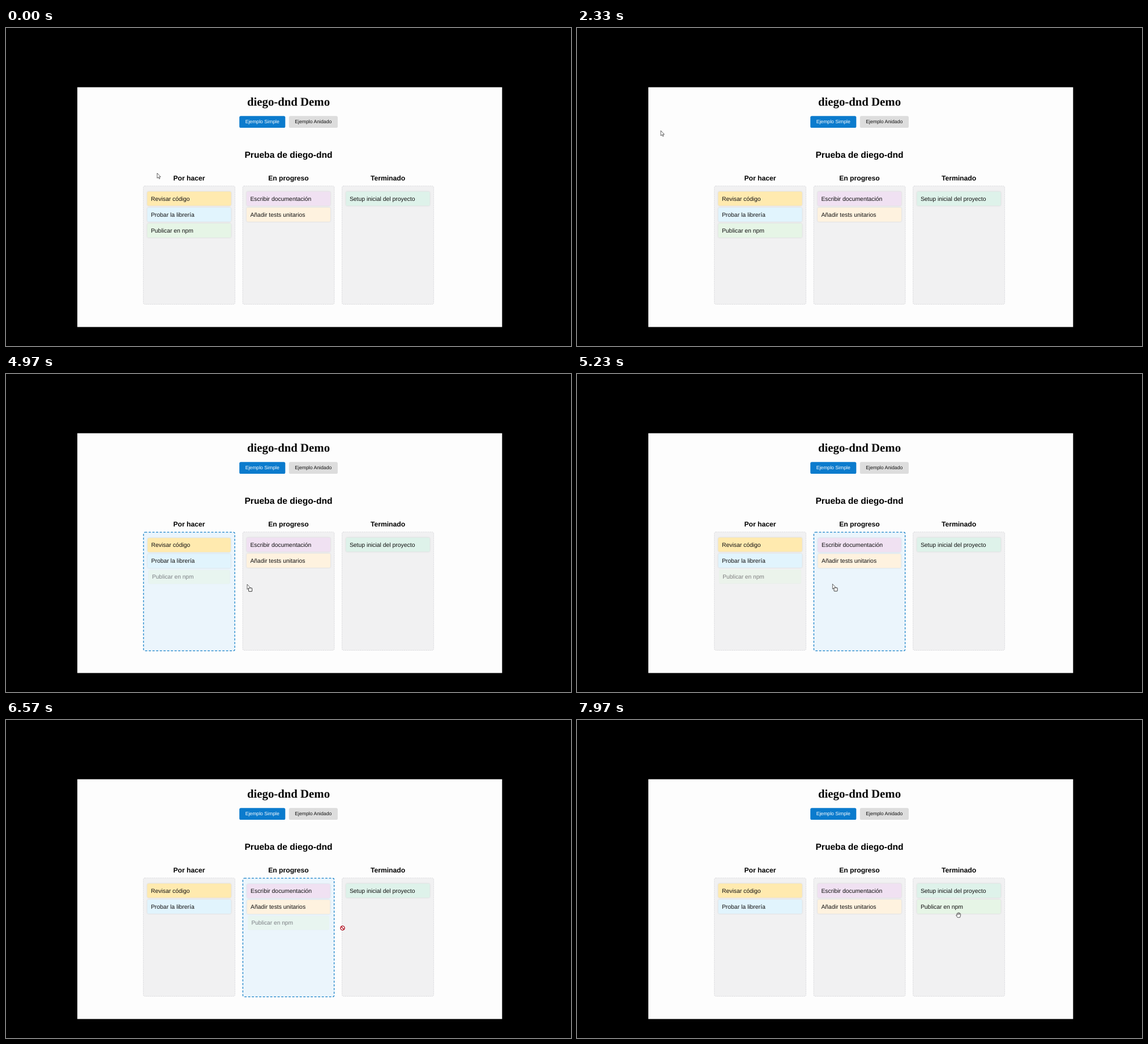
These frames come from a looping animation (998x561 px, 8000 ms). An HTML page:

```html
<!DOCTYPE html>
<html lang="es">
<head>
<meta charset="utf-8">
<title>diego-dnd Demo</title>
<style>
  html, body { margin: 0; width: 100%; height: 100%; overflow: hidden; background: #000; }
  svg { display: block; width: 998px; height: 561px; }
  text { font-family: "Liberation Sans", Arial, sans-serif; fill: #111; text-rendering: geometricPrecision; }
  .mid { text-anchor: middle; }
  .title { font: bold 20.8px "Liberation Serif", "Times New Roman", serif; fill: #000; }
  .sub { font-size: 15.6px; font-weight: bold; fill: #000; }
  .head { font-size: 12.17px; font-weight: bold; fill: #000; }
  .btn { font-size: 8.67px; }
  .task { font-size: 10.4px; }
  .card { filter: drop-shadow(0 .65px .8px rgba(0, 0, 0, .14)); }
</style>
</head>
<body>
<svg id="stage" viewBox="0 0 998 561">
  <rect x="126" y="104.5" width="750.3" height="423" fill="#fdfdfd"/>
  <text class="mid title" x="499" y="137.3">diego-dnd Demo</text>
  <rect x="412.2" y="155.2" width="81.1" height="20.8" rx="2.6" fill="#0b7bcd"/>
  <text class="mid btn" x="452.7" y="168.4" style="fill:#fff">Ejemplo Simple</text>
  <rect x="499.8" y="155.2" width="86.1" height="20.8" rx="2.6" fill="#ddd"/>
  <text class="mid btn" x="542.8" y="168.4">Ejemplo Anidado</text>
  <text class="mid sub" x="499" y="229.2">Prueba de diego-dnd</text>
  <g id="board"></g>
  <g id="arrow">
    <path d="M0 0V9L2.1 7.2L3.6 10.2L4.9 9.6L3.5 6.7H6.2Z" fill="#fff" stroke="#222" stroke-width=".7"/>
    <rect id="parcel" x="2.6" y="6.6" width="6" height="6" rx=".6" fill="#fff" stroke="#222" stroke-width=".9"/>
  </g>
  <g id="hand">
    <path d="M-1.9 4.3L-4.2 .9Q-4.4 -.4 -3.1 -.1L-2.5 .5L-3 -2.4Q-2.3 -3.8 -1.6 -2.8L-1.2 -3.7Q-.4 -4.8 .3 -3.7Q1.6 -4.5 2 -2.8Q3.5 -3.1 3.6 -1.6L3.5 1L2.4 4.3Z
      M-1.5 -2.8L-1 -.5M.3 -3.7V-.5M2 -2.8L1.7 -.3" fill="#fff" stroke="#222" stroke-width=".75" stroke-linejoin="round"/>
  </g>
  <g id="deny" fill="none" stroke="#b00d1e" stroke-width="1.4">
    <circle r="3.6" fill="#fff"/>
    <path d="M-2.5 -2.5L2.5 2.5"/>
  </g>
</svg>
<script>
const LOOP = 8000;
const TOP = 278.4, COL_W = 162.5;
const colX = [242.25, 417.75, 593.25];
const heads = ['Por hacer', 'En progreso', 'Terminado'];

// text, colour, column, row
const tasks = [
  ['Revisar código', '#ffeaaf', 0, 0],
  ['Probar la librería', '#e1f4fd', 0, 1],
  ['Publicar en npm', '#e6f5e6', 0, 2],
  ['Escribir documentación', '#f0e1f2', 1, 0],
  ['Añadir tests unitarios', '#fef2df', 1, 1],
  ['Setup inicial del proyecto', '#def2ea', 2, 0]
];
const MOVER = 2;

// pointer: time, x, y
const path = [
  [0, 267, 256], [770, 600, 258], [1070, 600, 258], [1530, 330, 252], [1670, 330, 252],
  [2330, 148, 181], [2470, 330, 357], [4770, 330, 357], [4970, 426, 371],
  [5480, 475, 370], [5720, 475, 370], [6170, 500, 360], [6330, 500, 360],
  [6570, 594.5, 367], [6970, 634.5, 349], [7170, 634.5, 349], [7940, 674, 344]
];
// state changes: time, pointer kind, active column, column and row of the moved task
const states = [
  [0, 'arrow', -1, 0, 2],
  [2450, 'hand', -1, 0, 2],
  [4820, 'drag', 0, 0, 2],
  [5000, 'drag', 1, 0, 2],
  [5470, 'arrow', -1, 1, 2],
  [6000, 'hand', -1, 1, 2],
  [6390, 'drag', 1, 1, 2],
  [6535, 'deny', 1, 1, 2],
  [6600, 'drag', 2, 1, 2],
  [7000, 'arrow', -1, 2, 1],
  [7660, 'hand', -1, 2, 1]
];

const $ = id => document.getElementById(id);
function add(parent, tag, attrs, text) {
  const el = document.createElementNS('http://www.w3.org/2000/svg', tag);
  set(el, attrs);
  if (text) el.textContent = text;
  return parent.appendChild(el);
}
function set(el, attrs) {
  for (const k in attrs) el.setAttribute(k, attrs[k]);
}

const board = $('board');
const cols = colX.map((x, i) => {
  add(board, 'text', { class: 'mid head', x: x + COL_W / 2, y: 268.8 }, heads[i]);
  return add(board, 'rect', { rx: 2.6 });
});
const cards = tasks.map(([label, fill]) => {
  const g = add(board, 'g', {});
  const box = add(g, 'rect', { class: 'card', height: 25, rx: 2.6, fill });
  add(g, 'text', { class: 'task', x: 6.5, y: 16 }, label);
  return { g, box };
});

function drawBoard(active, moverCol, moverRow, dragging) {
  cols.forEach((el, i) => {
    const on = i === active, w = on ? 1.3 : .65;
    set(el, {
      x: colX[i] + w / 2, y: TOP + w / 2,
      width: COL_W - w, height: 208 + w,
      fill: on ? '#ebf5fc' : '#f1f1f2',
      stroke: on ? '#1580c8' : '#c6c6cc',
      'stroke-width': w, 'stroke-dasharray': `${3 * w} ${2 * w}`
    });
  });
  cards.forEach(({ g, box }, i) => {
    const moved = i === MOVER;
    const col = moved ? moverCol : tasks[i][2];
    const row = moved ? moverRow : tasks[i][3];
    const border = col === active ? 1.3 : .65;
    const width = COL_W - 13 - 2 * border;
    const held = moved && dragging;
    const x = colX[col] + 6.5 + border;
    const y = TOP + 9.5 + border + row * 28.1;
    const shrink = held ? ` translate(${width / 2} 12.5) scale(.98) translate(${-width / 2} -12.5)` : '';
    set(box, { width });
    set(g, { transform: `translate(${x} ${y})${shrink}`, opacity: held ? .5 : 1 });
  });
}

function pointerAt(t) {
  const i = path.findIndex(p => p[0] > t);
  if (i < 0) return path[path.length - 1].slice(1);
  const [t0, x0, y0] = path[i - 1], [t1, x1, y1] = path[i];
  const u = (t - t0) / (t1 - t0), k = u * u * (3 - 2 * u);
  return [x0 + (x1 - x0) * k, y0 + (y1 - y0) * k];
}

function drawPointer(t, kind) {
  const [x, y] = pointerAt(t);
  const shape = kind === 'drag' ? 'arrow' : kind;
  for (const id of ['arrow', 'hand', 'deny']) {
    set($(id), { transform: `translate(${x} ${y})`, visibility: id === shape ? 'visible' : 'hidden' });
  }
  $('parcel').style.display = kind === 'drag' ? '' : 'none';
}

const start = performance.now();
function frame() {
  const t = (performance.now() - start) % LOOP;
  const [, kind, active, col, row] = states.filter(s => s[0] <= t).pop();
  drawBoard(active, col, row, active >= 0);
  drawPointer(t, kind);
  requestAnimationFrame(frame);
}
frame();
</script>
</body>
</html>
```
